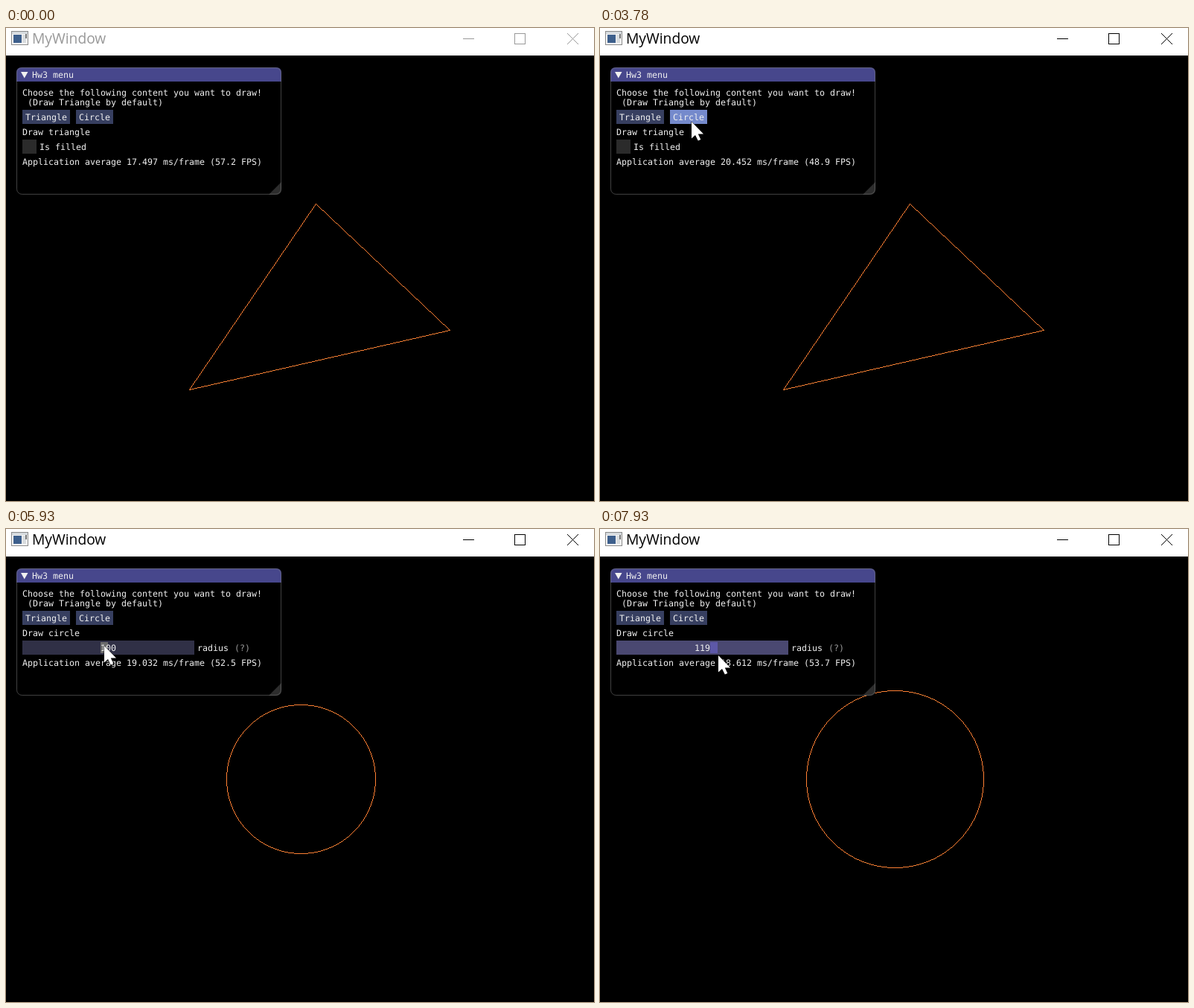
An HTML page with a canvas for the animation above (8000 ms loop, 790x636 px).

```html
<!DOCTYPE html>
<html lang="en">
<head>
<meta charset="utf-8">
<title>MyWindow</title>
<style>
  html, body { margin: 0; width: 100%; height: 100%; overflow: hidden; background: #000; }
  canvas, svg { position: absolute; left: 0; top: 0; }
  .ui { font: 11.63px "DejaVu Sans Mono", monospace; fill: #f0f0f0; text-rendering: geometricPrecision; }
  .caption { font: 19.2px "Open Sans", "Noto Sans", sans-serif; }
  .crisp { shape-rendering: crispEdges; }
</style>
</head>
<body>
<canvas id="scene" width="790" height="636"></canvas>
<svg width="790" height="636" viewBox="0 0 790 636">
  <rect width="790" height="37" fill="#fff"/>

  <g class="crisp">
    <rect x="7.5" y="4.5" width="22" height="18" fill="#f4f4f4" stroke="#8a8a8a"/>
    <rect x="8" y="5" width="21" height="3" fill="#d5dade"/>
    <rect x="10" y="9" width="11" height="11" fill="#3d5f8c"/>
    <rect x="22" y="9" width="5" height="11" fill="#d9dde0"/>
    <rect x="26" y="8" width="2" height="6" fill="#777"/>
  </g>
  <text class="caption" id="caption" x="35" y="21">MyWindow</text>
  <g id="controls" fill="none">
    <path class="crisp" d="M614 14.5H629M683.5 7.5H697.5V21.5H683.5Z"/>
    <path d="M754 7L769 22M769 7L754 22"/>
  </g>

  <rect x="14" y="53" width="356" height="171" rx="7" fill-opacity=".85"/>
  <path d="M14 72V60Q14 53 21 53H363Q370 53 370 60V72Z" fill="#47478c"/>
  <path d="M370 207V217Q370 224 363 224H353Z" fill="#2d2d2d"/>
  <rect x="14.5" y="53.5" width="355" height="170" rx="7" fill="none" stroke="#808080" stroke-opacity=".5"/>
  <path d="M20 59H29.5L24.75 67.5Z" fill="#f0f0f0"/>

  <g class="ui">
    <text x="35" y="67">Hw3 menu</text>
    <text x="22" y="91">Choose the following content you want to draw!</text>
    <text x="29" y="104">(Draw Triangle by default)</text>
    <rect id="triangleButton" x="22" y="110" width="64" height="19"/>
    <text x="26" y="124">Triangle</text>
    <rect id="circleButton" x="94" y="110" width="50" height="19"/>
    <text x="98" y="124">Circle</text>
    <text id="mode" x="22" y="144"></text>
    <g id="fillOption">
      <rect x="22" y="150" width="19" height="19" fill="#2b2b2b"/>
      <text x="45" y="164">Is filled</text>
    </g>
    <g id="slider">
      <rect id="track" x="22" y="150" width="231" height="19"/>
      <rect id="grab" y="152" width="10" height="15"/>
      <text id="value" x="137.5" y="164" text-anchor="middle"></text>
      <text x="257" y="164">radius</text>
      <text x="307" y="164" fill="#999">(?)</text>
    </g>
    <text id="stats" x="22" y="184"></text>
  </g>

  <path id="cursor" d="M0 0V22.5L5 18L8.8 25.5L12.3 24L8.8 16.5H16Z"
        fill="#fff" stroke="#000" paint-order="stroke"/>
</svg>
<script>
const LOOP = 8000, STEPS = 104;
const APPEAR = 18, PRESS = 48, RELEASE = 51, DRAG = 78;
const CENTER = { x: 396, y: 336 };

// Where the pointer rests on its way to the button and then to the slider.
const stops = [
  { step: 21, x: 206, y: 454 },
  { step: 44, x: 140, y: 131 },
  { step: 49, x: 123, y: 126 },
  { step: 61, x: 148, y: 195 },
  { step: 66, x: 139, y: 178 },
  { step: DRAG, x: 132, y: 157 },
];

const el = Object.fromEntries([...document.querySelectorAll("[id]")].map(e => [e.id, e]));
const ctx = el.scene.getContext("2d");
const set = (node, attrs) => {
  for (const name in attrs) node.setAttribute(name, attrs[name]);
};
const show = (node, on) => set(node, { visibility: on ? "visible" : "hidden" });
const plot = (dx, dy) => ctx.fillRect(CENTER.x + Math.round(dx), CENTER.y + Math.round(dy), 1, 1);
const mix = (a, b, k) => a + (b - a) * k;
const ease = k => {
  k = Math.min(1, Math.max(0, k));
  return k * k * (3 - 2 * k);
};

function drawLine([x0, y0], [x1, y1]) {
  const count = Math.max(Math.abs(x1 - x0), Math.abs(y1 - y0));
  for (let i = 0; i <= count; i++) plot(mix(x0, x1, i / count), mix(y0, y1, i / count));
}

function drawTriangle() {
  const corners = [[20, -100], [200, 70], [-150, 150]];
  corners.forEach((corner, i) => drawLine(corner, corners[(i + 1) % 3]));
}

function drawCircle(r) {
  for (let a = 0; a <= r * Math.SQRT1_2 + 0.5; a++) {
    const b = Math.sqrt(r * r - a * a);
    for (const s of [-1, 1]) for (const t of [-1, 1]) {
      plot(s * a, t * b);
      plot(t * b, s * a);
    }
  }
}

// The handle swings to and fro, faster and faster.
function radiusAt(step) {
  if (step < DRAG) return 100;
  const d = step - DRAG;
  const halfTurns = d * (0.0643 + 0.00503 * d + 0.0000242 * d * d);
  return Math.round(101 - 45 * Math.sin(Math.PI * halfTurns));
}

const grabCenter = radius => 29 + (radius - 10) * 1.142;

function pointerAt(step) {
  if (step >= DRAG) {
    return [grabCenter(radiusAt(step)) + 6, mix(157, 170, ease((step - 85) / 11))];
  }
  const i = Math.max(1, stops.findIndex(stop => stop.step > step));
  const a = stops[i - 1], b = stops[i];
  const k = ease((step - a.step) / (b.step - a.step));
  return [mix(a.x, b.x, k), mix(a.y, b.y, k)];
}

// A short warm-up, then one slow swell in the middle.
function frameTimeAt(step) {
  const s = step / STEPS;
  return 18.6 + 1.867 * Math.exp(-(((s - 0.45) / 0.24) ** 2)) - 1.1585 * Math.exp(-s / 0.05);
}

function draw(time) {
  const step = Math.min(STEPS - 1, Math.floor((time + 16) * STEPS / LOOP));
  const focused = step >= PRESS, circleMode = step >= RELEASE, dragging = step >= DRAG;
  const [x, y] = pointerAt(step).map(Math.round);
  const over = (left, top, right, bottom) =>
    step >= APPEAR && x >= left && x < right && y >= top && y < bottom;
  const radius = radiusAt(step);

  ctx.clearRect(0, 0, 790, 636);
  ctx.fillStyle = "#ff8033";
  if (circleMode) drawCircle(radius);
  else drawTriangle();

  const ink = focused ? "#000" : "#999";
  set(el.caption, { fill: ink });
  set(el.controls, { stroke: ink });
  show(el.fillOption, !circleMode);
  show(el.slider, circleMode);
  el.mode.textContent = circleMode ? "Draw circle" : "Draw triangle";

  const idle = "#373f60", hover = "#51618f", pressed = focused && !circleMode;
  set(el.triangleButton, { fill: over(22, 110, 86, 129) ? hover : idle });
  set(el.circleButton, { fill: pressed ? "#758acc" : over(94, 110, 144, 129) ? hover : idle });

  set(el.track, { fill: dragging ? "#4a4871" : over(22, 150, 253, 169) ? "#303046" : "#2b2b2b" });
  set(el.grab, { x: Math.round(grabCenter(radius) - 5), fill: dragging ? "#5d58a8" : "#6b6b6b" });
  el.value.textContent = radius;

  const ms = frameTimeAt(step);
  el.stats.textContent =
    `Application average ${ms.toFixed(3)} ms/frame (${(1000 / ms).toFixed(1)} FPS)`;

  show(el.cursor, step >= APPEAR);
  set(el.cursor, { transform: `translate(${x} ${y})` });
}

const start = performance.now();
function tick() {
  draw((performance.now() - start) % LOOP);
  requestAnimationFrame(tick);
}
tick();
</script>
</body>
</html>
```
